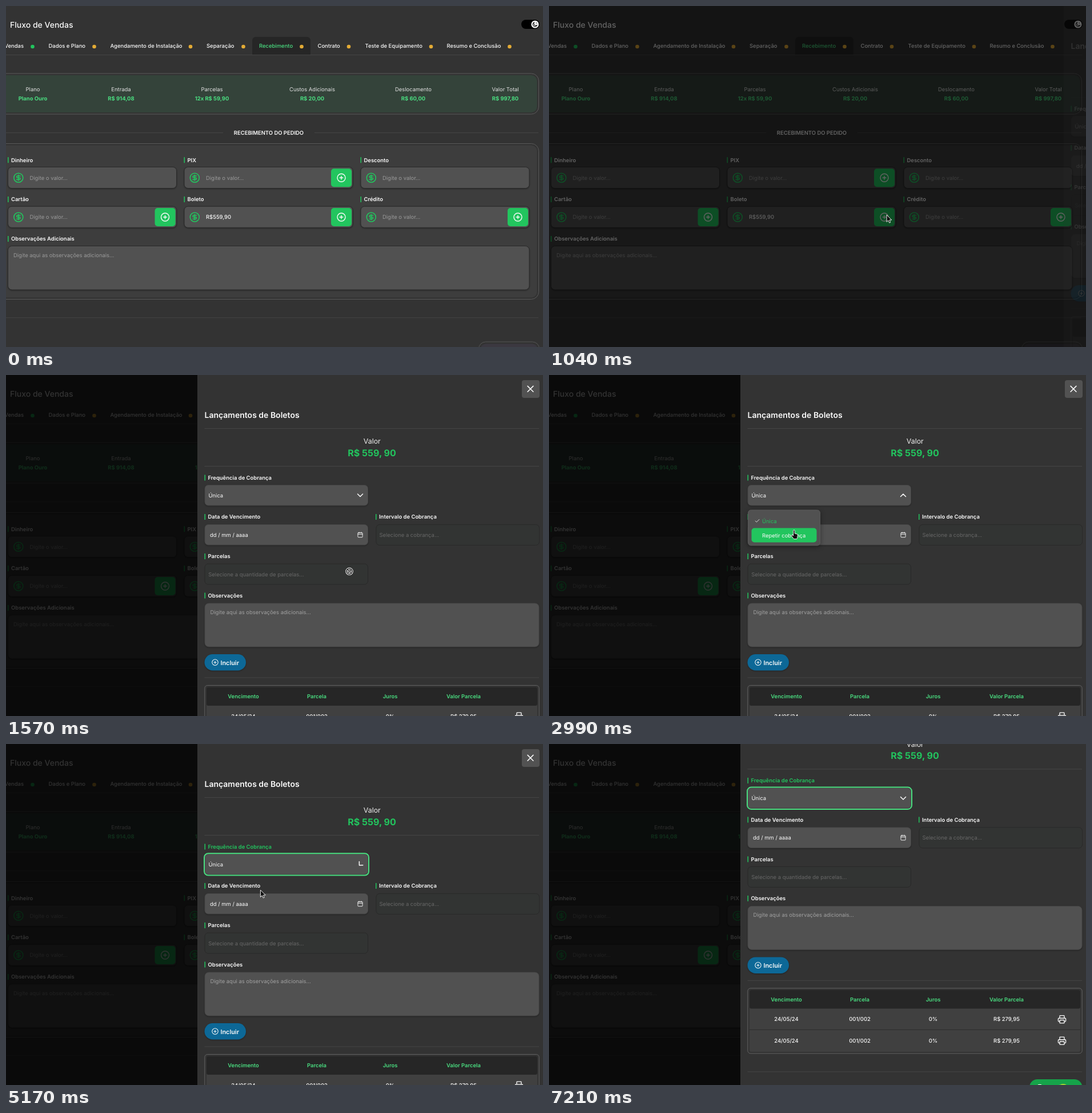
These frames come from a looping animation (940x596 px, 7.29 s). An HTML page:

```html
<!DOCTYPE html>
<html lang="pt-BR">
<head>
<meta charset="utf-8">
<title>Fluxo de Vendas</title>
<style>
html, body { margin: 0; width: 100%; height: 100%; overflow: hidden; background: #333; }
svg { display: block; width: 940px; height: 596px; }
text { font-family: Inter, "Liberation Sans", sans-serif; text-rendering: geometricPrecision; white-space: pre; }
.lift { filter: drop-shadow(0 1px 1px rgba(0, 0, 0, .35)); }
.pop { filter: drop-shadow(0 2px 4px rgba(0, 0, 0, .4)); }
</style>
</head>
<body>
<svg id="stage" viewBox="0 0 940 596" xmlns="http://www.w3.org/2000/svg"></svg>
<script>
const LOOP = 7290;
const GREEN = '#22c55e', MINT = '#4ade80', WHITE = '#fafafa', FIELD = '#515151', BASE = 9.45;

// ---- drawing helpers ----
const text = (x, cy, str, { size = BASE, w = 400, fill = WHITE, at = 'start', id = '' } = {}) =>
  `<text${id && ` id="${id}"`} x="${x}" y="${cy + size * .36}" font-size="${size}" font-weight="${w}" fill="${fill}" text-anchor="${at}">${str}</text>`;
const mid = (x, cy, str, o = {}) => text(x, cy, str, { ...o, at: 'middle' });
const box = (x, y, w, h, r, fill, extra = '') =>
  `<rect x="${x}" y="${y}" width="${w}" height="${h}" rx="${r}" fill="${fill}" ${extra}/>`;
const rule = (x1, x2, y, c = '#454545') => `<path d="M${x1} ${y}H${x2}" stroke="${c}"/>`;
const dot = (x, y, r, fill) => `<circle cx="${x}" cy="${y}" r="${r}" fill="${fill}"/>`;

const ICONS = {
  dollar: '<circle cx="12" cy="12" r="10"/><path d="M16 8h-6a2 2 0 1 0 0 4h4a2 2 0 1 1 0 4H8M12 18V6"/>',
  plus: '<circle cx="12" cy="12" r="10"/><path d="M8 12h8M12 8v8"/>',
  chevron: '<path d="m6 9 6 6 6-6"/>',
  check: '<path d="M20 6 9 17l-5-5"/>',
  close: '<path d="M18 6 6 18M6 6l12 12"/>',
  calendar: '<path d="M8 2v4M16 2v4M3 10h18"/><rect x="3" y="4" width="18" height="18" rx="2"/>',
  printer: '<path d="M6 18H4a2 2 0 0 1-2-2v-5a2 2 0 0 1 2-2h16a2 2 0 0 1 2 2v5a2 2 0 0 1-2 2h-2M6 9V3a1 1 0 0 1 1-1h10a1 1 0 0 1 1 1v6"/><rect x="6" y="14" width="12" height="8" rx="1"/>'
};
const icon = (name, cx, cy, k, color = WHITE, sw = 2) =>
  `<g transform="translate(${cx} ${cy}) scale(${k}) translate(-12 -12)" fill="none" stroke="${color}" stroke-width="${sw}" stroke-linecap="round" stroke-linejoin="round">${ICONS[name]}</g>`;

const label = (x, cy, str, id = '') =>
  box(x, cy - 5, 1.5, 10, 0, GREEN) + text(x + 6, cy, str, { w: 600, id });

// ---- sales page ----
function money(x, y, name, { value, add } = {}) {
  const cy = y + 18.7;
  return label(x - .5, y - 12.3, name) +
    box(x, y, 295, 37, 6.5, FIELD, 'stroke="#2b2b2b" class="lift"') +
    icon('dollar', x + 18.3, cy, .8, GREEN) +
    text(x + 38, cy, value || 'Digite o valor...', { w: value ? 500 : 400, fill: value ? WHITE : '#9a9a9a' }) +
    (add ? box(x + 257, y + 2.7, 36, 32, 5, GREEN) + icon('plus', x + 275, cy, .7) : '');
}

function frame(y, h, fill) {
  return box(-40, y, 972.5, h, 13, 'none', 'stroke="#5a5a5a"') + box(-40, y + 3, 969.5, h - 6, 10, fill);
}

function page() {
  const tabs = [[74.5, 'Dados e Plano', 154.5], [182.5, 'Agendamento de Instalação', 323], [351, 'Separação', 415.5],
    [443, 'Recebimento', 517.5], [545.5, 'Contrato', 600], [628.5, 'Teste de Equipamento', 744], [771.5, 'Resumo e Conclusão', 881.5]];
  const sums = [[47, 'Plano', 'Plano Ouro'], [201.5, 'Entrada', 'R$ 914,08'], [360.5, 'Parcelas', '12x R$ 59,90'],
    [536, 'Custos Adicionais', 'R$ 20,00'], [713, 'Deslocamento', 'R$ 60,00'], [874, 'Valor Total', 'R$ 997,80']];
  let s = box(0, 0, 940, 596, 0, '#333') + text(7, 32.5, 'Fluxo de Vendas', { size: 14, w: 500 });
  s += box(902, 24, 32, 16, 8, '#000') + dot(926, 32, 6.6, '#fff') +
    '<path d="M925 28.2a3.9 3.9 0 1 0 4.8 4.9a3.2 3.2 0 0 1-4.8-4.9z" fill="none" stroke="#111" stroke-width="1.1"/>' + dot(928.3, 29.7, .8, '#111');
  s += rule(0, 934, 85.5) + '<path d="M431 85V60a6 6 0 0 1 6-6H527a6 6 0 0 1 6 6V85z" fill="#262626"/>';
  s += text(31, 70, 'Vendas', { w: 500, at: 'end' }) + dot(46.5, 71, 3.3, GREEN);
  for (const [x, name, d] of tabs)
    s += text(x, 70, name, { w: 500, fill: name === 'Recebimento' ? MINT : WHITE }) + dot(d, 71, 3.3, '#e3ab35');
  s += frame(118, 71, '#34433a');
  for (const [x, name, v] of sums)
    s += mid(x, 146, name, { fill: '#e2e2e2' }) + mid(x, 161.5, v, { w: 700, fill: MINT });
  s += rule(0, 380, 221.5) + rule(540, 932, 221.5) + mid(460, 221.5, 'RECEBIMENTO DO PEDIDO', { w: 600 });
  s += frame(240.5, 272, '#3d3d3d');
  s += money(3.5, 281.5, 'Dinheiro') + money(312, 281.5, 'PIX', { add: 1 }) + money(621, 281.5, 'Desconto');
  s += money(3.5, 350.3, 'Cartão', { add: 1 }) + money(312, 350.3, 'Boleto', { add: 1, value: 'R$559,90' }) + money(621, 350.3, 'Crédito', { add: 1 });
  s += label(3, 407, 'Observações Adicionais') + box(3.5, 419.5, 912.5, 76.5, 7, FIELD, 'stroke="#2b2b2b" class="lift"') +
    text(13, 436, 'Digite aqui as observações adicionais...', { fill: '#9a9a9a' });
  s += rule(0, 932, 544.8) + box(827.5, 587, 106, 40, 12, 'none', 'stroke="#555"') + box(831, 590.5, 99, 36, 9, '#3b3840');
  return s;
}

// ---- drawer ----
const on = (x, y) => box(x, y, 285.5, 35.5, 6, FIELD, 'stroke="#474747" class="lift"');
const off = (x, y) => box(x, y, 285.5, 36, 6, '#323433', 'stroke="#292929"');
const group = (id, body, extra = '') => `<g id="${id}" ${extra}>${body}</g>`;

function drawer() {
  const dim = { fill: '#676767' };
  const cols = [415.5, 544, 672.5, 801];
  const cells = (cy, list, o) => list.map((v, i) => mid(cols[i], cy, v, o)).join('');
  let s = box(903, 9, 31, 31, 4, '#525252') + icon('close', 918, 24.3, .82);
  s += text(347.5, 70, 'Lançamentos de Boletos', { size: 14, w: 600 }) + rule(347.5, 933, 93.5);
  s += mid(640.8, 116, 'Valor', { size: 12.4, fill: '#ececec' }) + mid(640.5, 136, 'R$ 559, 90', { size: 16, w: 700, fill: GREEN }) + rule(347.5, 933, 159.5);

  s += label(347.5, 179.5, 'Frequência de Cobrança', 'freqLabel') + on(348, 192.5);
  s += box(347, 191.2, 288, 38.3, 7, 'none', `id="ring" stroke="${MINT}" stroke-width="2"`);
  s += text(354.5, 210.5, 'Única', { id: 'freq' }) + group('arrow', icon('chevron', 0, 0, .75));

  s += label(347.5, 248, 'Data de Vencimento') + label(647, 248, 'Intervalo de Cobrança') + label(347.5, 317, 'Parcelas');
  s += group('single',
    on(348, 261.5) + text(357, 279.3, 'dd / mm / aaaa') + icon('calendar', 620, 279.2, .45) +
    off(648, 261.5) + text(653.5, 279.5, 'Selecione a cobrança...', dim) +
    off(348, 330) + text(354.3, 348.2, 'Selecione a quantidade de parcelas...', dim));
  s += group('repeat',
    off(348, 261.5) + on(648, 261.5) + text(653.5, 279.5, 'Selecione a cobrança...') + icon('chevron', 919, 279, .75) +
    on(348, 330.2) + text(354.3, 348.2, 'Selecione a quantidade de parcelas...') + icon('chevron', 620, 348, .75));

  s += label(347.5, 385.5, 'Observações') + box(348, 399, 585, 76, 7, FIELD, 'stroke="#474747" class="lift"') +
    text(357.5, 414.5, 'Digite aqui as observações adicionais...', { fill: '#a0a0a0' });
  s += box(347.5, 488, 72.5, 28.5, 14.2, '#0d6897', 'class="lift"') + icon('plus', 366, 502.3, .52) +
    text(375.5, 503, 'Incluir', { size: 10.8, w: 600 }) + rule(347.5, 933, 529);

  s += box(347.8, 542.5, 585.4, 114, 5, 'none', 'stroke="#626262"') + box(351, 545.5, 579, 108, 3, '#404040') + box(351, 545.5, 579, 32.5, 3, '#262626');
  s += cells(562, ['Vencimento', 'Parcela', 'Juros', 'Valor Parcela'], { w: 600, fill: MINT }) + rule(351, 930, 615, '#2c2c2c');
  for (const cy of [596.5, 634])
    s += cells(cy, ['24/05/24', '001/002', '0%', 'R$ 279,95'], { w: 500 }) + icon('printer', 898, cy + .3, .66);
  s += rule(347.5, 933, 688.5) + box(841, 701.5, 92.5, 28.5, 14.2, '#16a34a') +
    icon('plus', 859, 716, .52) + text(869, 716, 'Confirmar', { size: 10.8, w: 600 });

  const option = (i, cy, str) => box(354.5, cy - 12.5, 114, 25, 5, GREEN, `id="hot${i}"`) +
    group('tick' + i, icon('check', 364.6, cy, .42)) + text(373, cy + .3, str, { id: 'opt' + i });
  s += group('menu', box(348.5, 236, 126, 62, 5, FIELD, 'stroke="#606060" stroke-width=".8" class="pop"') +
    option(0, 255, 'Única') + option(1, 280, 'Repetir cobrança'));
  return box(335, 0, 606, 596, 0, '#333') + group('scroll', s);
}

// ---- pointer ----
const HAND = 'M-1.4 9V1.2a1.3 1.3 0 0 1 2.6 0V6l3.8.9q1.4.4 1.3 2l-.6 4q-.2 1.6-.8 2.6H-.6q-1-1.6-3.8-5q-.8-1.4.6-1.8q1-.2 2.4 1.3z';
const pointer = group('arrowPtr', '<path d="M0 0V12.4L2.9 9.8L4.8 14L6.8 13.1L5 9H8.9z"/>') +
  group('handPtr', `<path d="${HAND}"/>`) +
  group('noPtr', '<circle r="5" fill="none" stroke="#fff" stroke-width="3.4"/><path d="M-3.6-3.6L3.6 3.6" stroke="#fff" stroke-width="3.2"/>' +
    '<circle r="5" fill="none" stroke="#222" stroke-width="1.5"/><path d="M-3.6-3.6L3.6 3.6" stroke="#222" stroke-width="1.4"/>');

document.getElementById('stage').innerHTML = page() +
  box(0, 0, 940, 596, 0, '#000', 'id="shade"') + group('drawer', drawer()) +
  `<circle id="click" cx="900" cy="604" r="10" fill="#c8dc2c" opacity=".8"/>` +
  group('pointer', pointer, 'fill="#111" stroke="#fff" stroke-width=".9" stroke-linejoin="round"');

const el = {};
document.querySelectorAll('[id]').forEach(n => el[n.id] = n);

// ---- timeline ----
const OPEN1 = 2190, PICK1 = 3040, OPEN2 = 3670, PICK2 = 5030;
// time, x, y
const PATH = [
  [0, 900, 604], [70, 894, 538], [250, 800, 470], [450, 660, 395], [620, 596, 362], [760, 584, 356], [820, 584, 356], [1040, 591, 365],
  [1500, 591, 365], [1570, 601, 343.5], [1700, 608, 300], [1850, 592, 245], [2050, 563, 212],
  [2190, 563, 212], [2500, 480, 240], [2750, 435, 266], [2860, 429, 271],
  [3060, 429, 271], [3200, 440, 262], [3450, 490, 225], [3610, 505, 208],
  [3670, 505, 208], [3850, 480, 240], [4020, 450, 298], [4200, 436, 262], [4290, 431, 242.3], [4360, 429, 244.5],
  [4440, 429, 244.5], [4760, 420, 253], [5030, 420, 253], [5170, 445, 255], [5400, 540, 285], [5710, 653, 322],
  [6340, 653, 322], [6400, 660, 330], [6650, 790, 480], [6950, 900, 604], [LOOP, 900, 604]
];
const HANDS = [[600, 830], [1930, 2350], [3500, 3760]];

const part = (t, a, b) => Math.min(1, Math.max(0, (t - a) / (b - a)));
const ease = u => u * u * (3 - 2 * u);
const within = (t, a, b) => t >= a && t < b;
const show = (n, yes) => n.style.display = yes ? '' : 'none';
const set = (n, k, v) => n.setAttribute(k, v);

function place(t) {
  let i = 0;
  while (i < PATH.length - 2 && t >= PATH[i + 1][0]) i++;
  const [a, x0, y0] = PATH[i], [b, x1, y1] = PATH[i + 1], u = part(t, a, b);
  return [x0 + (x1 - x0) * u, y0 + (y1 - y0) * u];
}

function draw(t) {
  const [x, y] = place(t);
  const open = within(t, OPEN1, PICK1) || within(t, OPEN2, PICK2);
  const repeat = within(t, PICK1, PICK2);
  const ring = within(t, PICK1, OPEN2) || t >= PICK2;

  const slide = ease(part(t, 977, 1390));
  set(el.shade, 'opacity', .8 * part(t, 800, 1120));
  set(el.drawer, 'transform', `translate(${605 * (1 - slide)} 0)`);
  set(el.drawer, 'opacity', Math.min(1, slide * 2));
  show(el.drawer, slide > 0);
  const u = part(t, 5735, 6070);
  set(el.scroll, 'transform', `translate(0 ${-115.6 * (1 - (1 - u) ** 2)})`);

  // select and dependent fields
  show(el.ring, ring);
  set(el.freqLabel, 'fill', ring ? GREEN : WHITE);
  el.freq.textContent = repeat ? 'Repetir cobrança' : 'Única';
  show(el.single, !repeat);
  show(el.repeat, repeat);
  const turn = part(t, OPEN1, OPEN1 + 190) - part(t, PICK1, PICK1 + 190) + part(t, OPEN2, OPEN2 + 190) - part(t, PICK2, PICK2 + 187);
  set(el.arrow, 'transform', `translate(620 210.3) rotate(${180 * turn})`);

  // menu
  const over = open && x > 354 && x < 469 && within(y, 242.5, 292.5);
  let hot = over ? (y < 267.5 ? 0 : 1) : -1;
  if (!over && t < 2750) hot = 0;
  if (!over && within(t, OPEN2, 3850)) hot = 1;
  show(el.menu, open);
  set(el.menu, 'opacity', t < OPEN2 ? part(t, OPEN1 - 40, OPEN1 + 90) : part(t, OPEN2 - 40, OPEN2 + 90));
  for (const i of [0, 1]) {
    show(el['hot' + i], hot === i);
    show(el['tick' + i], i === (repeat ? 1 : 0));
    set(el['opt' + i], 'fill', hot === i ? WHITE : GREEN);
  }

  // pointer
  const no = within(t, 1560, 1640);
  const hand = over || HANDS.some(([a, b]) => within(t, a, b));
  show(el.pointer, t >= 70);
  set(el.pointer, 'transform', `translate(${x} ${y})`);
  show(el.noPtr, no);
  show(el.handPtr, hand && !no);
  show(el.arrowPtr, !hand && !no);
  show(el.click, t >= 7210);
}

const start = performance.now();
function tick() {
  draw((performance.now() - start) % LOOP);
  requestAnimationFrame(tick);
}
draw(0);
requestAnimationFrame(tick);
</script>
</body>
</html>
```
